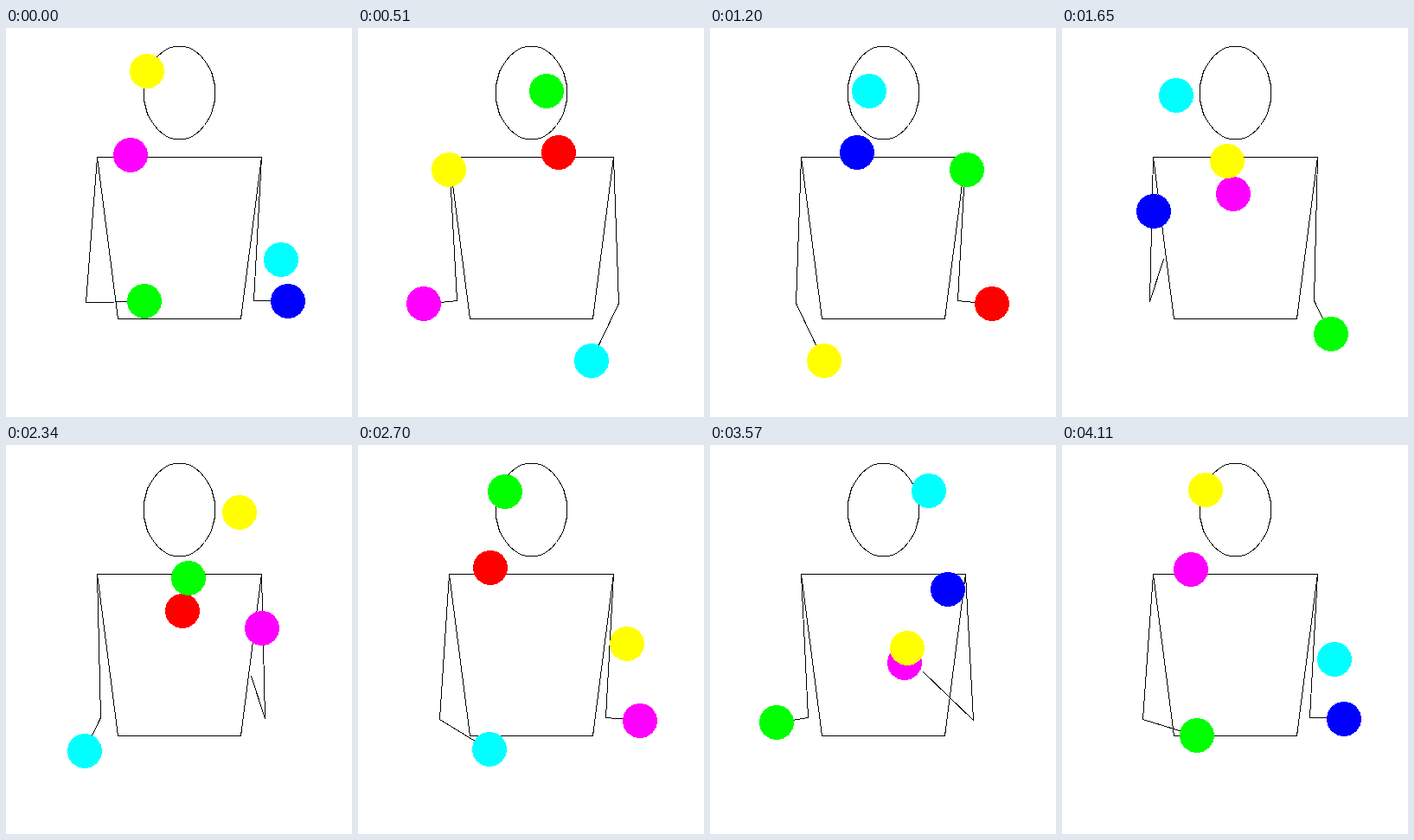
An HTML page that plays this animation: 400x450 px, repeating every 4140 ms.

```html
<!DOCTYPE html>
<html lang="en">
<head>
<meta charset="utf-8">
<title>Juggler</title>
<style>
  html, body { margin: 0; width: 100%; height: 100%; overflow: hidden; background: #fff; }
  svg { display: block; }
  .line { fill: none; stroke: #000; stroke-width: 1; }
</style>
</head>
<body>
<svg id="stage" width="400" height="450" viewBox="0 0 400 450" shape-rendering="crispEdges"></svg>
<script>
const stage = document.getElementById('stage');

// Time is counted in steps; both hands throw a pair every 46 steps, half a cycle apart.
const STEP_MS = 30, LOOP = 138, BEAT = 23;
const GRAVITY = 0.457;
const THROW = [242, 316], CATCH = [326, 316];
const MIRROR = 402;
const HIGH = 48.3, LOW = 39.1;          // flight times
const UPPER = 170.5, LOWER = 166, REACH = 123.5;
const SHOULDER = [295.4, 149];

const mod = (a, b) => ((a % b) + b) % b;
const px = v => Math.round(v) + 0.5;
const toPoints = list => list.map(([x, y]) => px(x) + ',' + px(y)).join(' ');

function add(tag, attrs) {
  const el = document.createElementNS('http://www.w3.org/2000/svg', tag);
  for (const name in attrs) el.setAttribute(name, attrs[name]);
  return stage.appendChild(el);
}

// Right hand knots: time, position, velocity.
const throwSpeed = [(MIRROR - CATCH[0] - THROW[0]) / HIGH, -GRAVITY * HIGH];
const knots = [
  { t: -BEAT, p: THROW, v: throwSpeed },
  { t: LOW - 2 * BEAT, p: CATCH, v: [0.6, 4.5] },
  { t: HIGH - 2 * BEAT, p: CATCH, v: [0.2, 1.85] },
  { t: BEAT, p: THROW, v: throwSpeed }
];

function hand(t) {
  const i = t < knots[1].t ? 0 : t < knots[2].t ? 1 : 2;
  const a = knots[i], b = knots[i + 1];
  const d = b.t - a.t, u = (t - a.t) / d, w = 1 - u;
  const blend = u * u * (3 - 2 * u);
  return [0, 1].map(k =>
    a.p[k] + (b.p[k] - a.p[k]) * blend + d * (u * w * w * a.v[k] - u * u * w * b.v[k]));
}

// Ball position; s counts steps since its throw from the right hand.
function ballAt(s, flight) {
  s = mod(s, LOOP);
  const fromLeft = s >= 3 * BEAT;
  s %= 3 * BEAT;
  let x, y;
  if (s < flight) {
    x = THROW[0] + (MIRROR - CATCH[0] - THROW[0]) * s / flight;
    y = THROW[1] - GRAVITY * s * (flight - s);
  } else {
    [x, y] = hand(s - 2 * BEAT);
    x = MIRROR - x;
  }
  return [fromLeft ? MIRROR - x : x, y];
}

// Two-link arm reaching forward; the elbow hangs below the shoulder-hand line.
function arm(t) {
  const [x, y] = hand(t);
  const wrist = [x - 1, y - 0.5];
  const dx = wrist[0] - SHOULDER[0], dy = wrist[1] - SHOULDER[1];
  const flat = Math.hypot(dx, REACH), dist = Math.hypot(flat, dy);
  const along = (dist * dist + UPPER * UPPER - LOWER * LOWER) / (2 * dist);
  const drop = Math.sqrt(Math.max(0, UPPER * UPPER - along * along));
  const out = (along * flat - drop * dy) / dist;
  const down = (along * dy + drop * flat) / dist;
  return [SHOULDER, [SHOULDER[0] + out * dx / flat, SHOULDER[1] + down], wrist];
}

const head = Array.from({ length: 40 }, (_, i) => {
  const a = i * Math.PI / 20;
  return [200 + 41.2 * Math.cos(a), 74.5 + 53.7 * Math.sin(a)];
});
add('polygon', { class: 'line', points: toPoints(head) });
add('polygon', { class: 'line', points: toPoints([[105, 149], [295, 149], [271, 336], [129, 336]]) });
const leftArm = add('polyline', { class: 'line' });
const rightArm = add('polyline', { class: 'line' });

const balls = [
  ['#f0f', 23, LOW], ['#f00', 69, LOW], ['#00f', -23, LOW],
  ['#0ff', -23, HIGH], ['#ff0', 23, HIGH], ['#0f0', 69, HIGH]
].map(([fill, offset, flight]) => ({ el: add('circle', { r: 20, fill }), offset, flight }));

function draw(n) {
  rightArm.setAttribute('points', toPoints(arm(mod(n + BEAT, 46) - BEAT)));
  leftArm.setAttribute('points', toPoints(arm(mod(n, 46) - BEAT).map(([x, y]) => [400 - x, y])));
  for (const { el, offset, flight } of balls) {
    const [x, y] = ballAt(n + offset, flight);
    el.setAttribute('cx', Math.round(x));
    el.setAttribute('cy', Math.round(y));
  }
}

let start;
function tick(now) {
  start ??= now;
  draw(Math.floor((now - start) / STEP_MS) % LOOP);
  requestAnimationFrame(tick);
}
draw(0);
requestAnimationFrame(tick);
</script>
</body>
</html>
```
